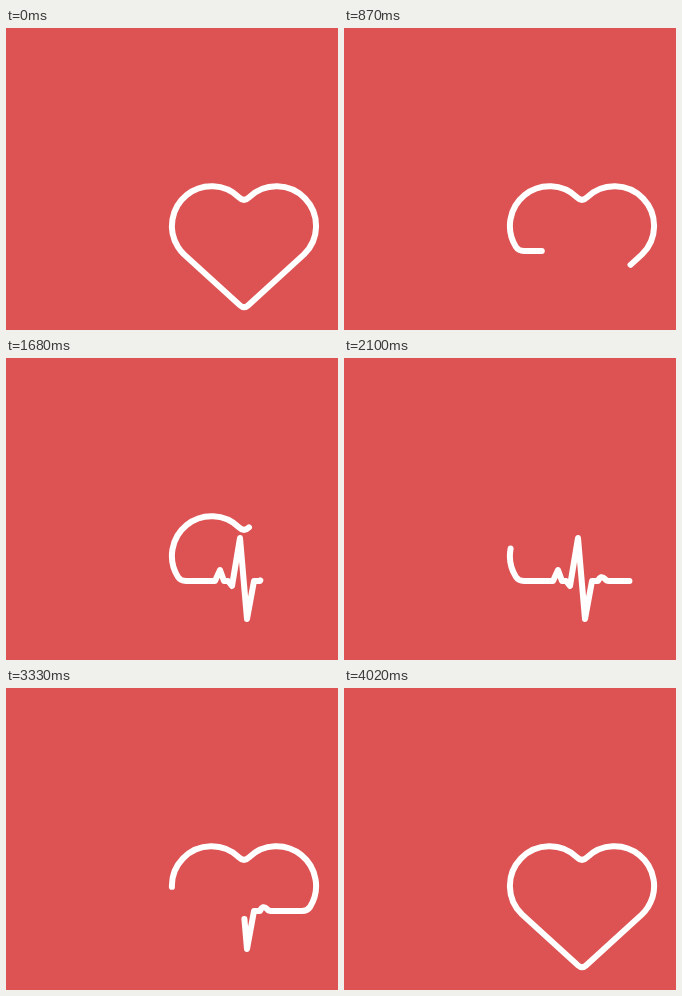
An HTML page for the animation above (6270 ms loop, 332 by 302 pixels).

```html
<!DOCTYPE html>
<html lang="en">
<head>
<meta charset="utf-8">
<title>Heartbeat line</title>
<style>
  html, body { margin: 0; width: 100%; height: 100%; overflow: hidden; background: #dd5353; }
  svg { display: block; width: 332px; height: 302px; }
  path { fill: none; stroke: #fff; stroke-width: 6; stroke-linecap: round; stroke-linejoin: round; }
</style>
</head>
<body>
<svg viewBox="0 0 332 302"><path id="line"/></svg>
<script>
const LOOP = 6270, STEP = 30, BEGIN = 300, BEAT = 620;

// One continuous route: heart outline, pulse trace, heart outline again.
const ARC = 'A39.6 39.6 0 0 0';
const BOTTOM = 'L234 277.4 Q238 281 242 277.4 L298 226.4';
const CUSP = 'Q238 174.4 233 169.4';
const PULSE = `Q174.6 223 180 223 H209 L214 212 L218 223 H222 L226 228 L234 180 L241 261
  L248 223 H254 Q257 216.5 261 221 Q262.5 223 265 223 H296 Q301.4 223 304 219`;
const ROUTE = `M172 219 ${ARC} 178 226.4 ${BOTTOM} ${ARC} 243 169.4 ${CUSP} ${ARC} 172 219
  ${PULSE} ${ARC} 243 169.4 ${CUSP} ${ARC} 178 226.4 ${BOTTOM} ${ARC} 304 219`;

// Distance of each line end along the route, one value per beat.
const HEAD = [420.7, 452, 652, 708, 774, 964, 1143];
const TAIL = [0, 166, 264, 398, 433, 611, 722.3];

const line = document.getElementById('line');
line.setAttribute('d', ROUTE);
line.setAttribute('pathLength', HEAD[HEAD.length - 1]);

// Smooth curve through the values that never runs backwards and rests at both ends.
function glide(values, beat) {
  const last = values.length - 1;
  const rise = i => values[i + 1] - values[i];
  const slope = i => i <= 0 || i >= last ? 0 : 2 * rise(i - 1) * rise(i) / (rise(i - 1) + rise(i));
  const i = Math.min(Math.floor(beat), last - 1), u = beat - i, v = 1 - u;
  return values[i] + rise(i) * u * u * (3 - 2 * u) + u * v * (slope(i) * v - slope(i + 1) * u);
}

function draw(time) {
  const t = Math.floor(time % LOOP / STEP) * STEP;
  const beat = Math.min(Math.max((t - BEGIN) / BEAT, 0), HEAD.length - 1);
  const head = glide(HEAD, beat), tail = glide(TAIL, beat);
  line.style.strokeDasharray = `${head - tail} 3000`;
  line.style.strokeDashoffset = -tail;
}

const start = performance.now();
function tick() {
  draw(performance.now() - start);
  requestAnimationFrame(tick);
}
tick();
</script>
</body>
</html>
```
